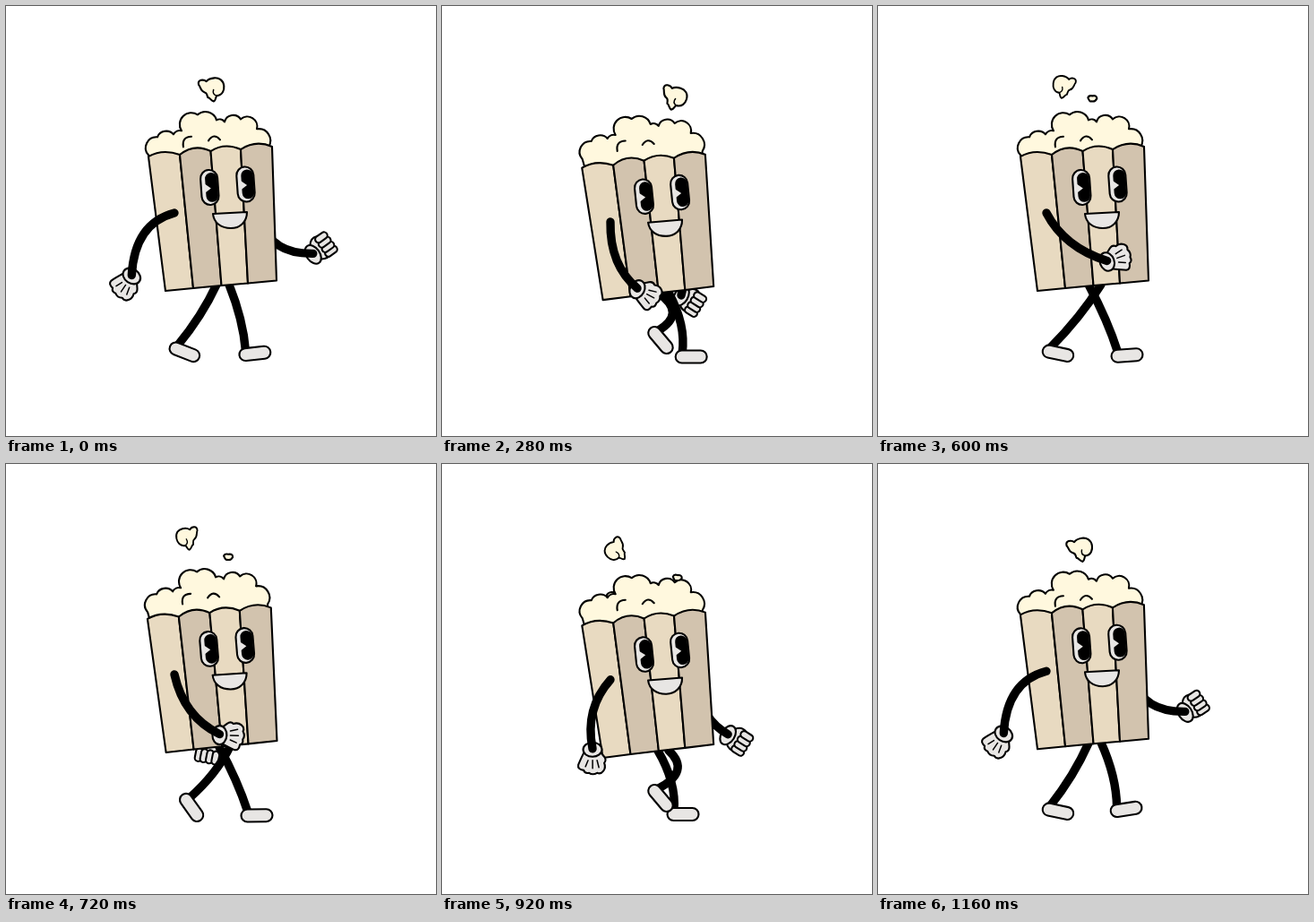
Recreate the animation shown at these times as an HTML page. Size 480 px wide and 480 px high, loop 1200 ms.

```html
<!DOCTYPE html>
<html lang="en">
<head>
<meta charset="utf-8">
<title>Walking popcorn</title>
<style>
  html, body { margin: 0; width: 100%; height: 100%; overflow: hidden; background: #fff; }
  svg { display: block; width: 100vw; height: 100vh; }
  .ink { stroke: #000; stroke-width: 2.1; stroke-linejoin: round; stroke-linecap: round; }
  .line { fill: none; }
  .corn { fill: #fff8de; }
  .pale { fill: #e8e6e4; }
  .light { fill: #e8dac1; }
  .dark { fill: #d2c3ae; }
  .limb { fill: none; stroke: #000; stroke-width: 9.4; stroke-linecap: round; }
</style>
</head>
<body>
<svg viewBox="0 0 480 480">
  <defs>
    <g id="kernel" class="ink">
      <path class="corn" d="M-5 -9 C-8 -12 -15 -12 -14 -6 C-12 -4 -13 1 -8 3 C-5 4 -6 7 -5 9 C-3 9 -2 13 1 14 C4 13 3 10 5 8 C12 8 14 2 14 -2 C14 -9 9 -12 4 -12 C0 -12 -3 -11 -5 -9Z"/>
      <path class="line" d="M5 8 Q0 6 2 1" stroke-width="1.5"/>
    </g>
    <rect id="foot" class="ink pale" x="-17.5" y="-7" width="35" height="14" rx="7"/>
    <g id="palm" class="ink pale">
      <path d="M3 -9 L8 -13 Q12 -16 15 -13 Q20 -15 24 -12 Q28 -9 26 -5 Q29 0 26 4 Q27 9 23 10 Q22 17 17 16 Q12 14 4 10Z"/>
      <path class="line" d="M12 -5 L20 -7 M12 0 H21 M12 5 L19 8" stroke-width="1.5"/>
      <ellipse rx="8" ry="10.5"/>
    </g>
    <rect id="finger" x="11" width="15" height="7.5" rx="3.7"/>
    <g id="fist" class="ink pale">
      <path d="M3 -10 Q8 -17 15 -14 L18 11 Q10 14 4 9Z"/>
      <use href="#finger" y="5"/>
      <use href="#finger" y="-1"/>
      <use href="#finger" y="-7.5"/>
      <use href="#finger" y="-14"/>
      <ellipse rx="7.5" ry="11.5"/>
    </g>
    <g id="eye">
      <rect class="ink pale" x="-9.5" y="-19.5" width="19" height="39" rx="9.5"/>
      <rect x="-4.5" y="-16.5" width="13.5" height="33" rx="6.75"/>
      <path class="pale" d="M-6 -5 L1.5 1 L-6 6Z"/>
    </g>
  </defs>

  <use id="kernel1" href="#kernel"/>
  <use id="kernel2" href="#kernel"/>
  <path id="crumb" class="ink corn" d="M-5 -1 Q-4 -4 0 -3 Q5 -4 5 0 Q3 4 -1 3 Q-3 4 -5 -1Z"/>

  <use id="backHand" href="#fist"/>
  <path id="backArm" class="limb"/>
  <path id="legA" class="limb"/>
  <path id="legB" class="limb"/>
  <use id="footA" href="#foot"/>
  <use id="footB" href="#foot"/>

  <g id="heap" class="ink">
    <path class="corn" d="M163 180 L159 166 A12 12 0 0 1 169 146 A10.5 10 0 0 1 187 143 A8 8 0 0 1 196 139 A13 13 0 0 1 214 121 A13 13 0 0 1 235 127 A7 7 0 0 1 244 129 A10 10 0 0 1 262 126 A11 11 0 0 1 280 137 A13 13 0 0 1 293 157 L292 174Z"/>
    <path class="line" d="M198 157 Q196 146 207 145.5 M226 150 Q232 141 239 149"/>
  </g>

  <g id="bucket">
    <g class="ink">
      <path class="light" d="M159 168 Q175 159 194 166 L209 315 L178 318Z"/>
      <path class="dark" d="M194 166 Q210 153 228.5 162 L240.5 312 L209 315Z"/>
      <path class="light" d="M228.5 162 Q244 152 262 160 L270 309.5 L240.5 312Z"/>
      <path class="dark" d="M262 160 Q279 149 297 157 L302 306.5 L270 309.5Z"/>
      <path class="pale" d="M231 232 L269 230 C269 241 261 248 251 248 C240 248 232 242 231 232Z"/>
    </g>
    <use href="#eye" transform="translate(227.3 202.5) rotate(-4)"/>
    <use href="#eye" transform="translate(267.5 199) rotate(-4)"/>
  </g>

  <use id="frontHand" href="#palm"/>
  <path id="frontArm" class="limb"/>
</svg>
<script>
const LOOP = 1200, STEP = 40;
const set = (id, name, value) => document.getElementById(id).setAttribute(name, value);
const wrap = t => (t % LOOP + LOOP) % LOOP;
const bob = t => (1 - Math.cos(t * Math.PI / 300)) / 2;
const place = (x, y, turn) => `translate(${x} ${y}) rotate(${turn})`;
const bend = (x0, y0, cx, cy, x1, y1) => `M${x0} ${y0}Q${cx} ${cy} ${x1} ${y1}`;

// One stride of a foot: [time, x, y, tilt]
const stride = [
  [0, 199, 387, 16], [180, 220, 380, 75], [300, 244, 373, 50], [500, 275, 383, -10],
  [620, 278, 390, -4], [940, 269, 391, 0], [1080, 236, 391, 0]
];

function slope(d0, h0, d1, h1) {
  return d0 * d1 <= 0 ? 0 : (d0 * h1 + d1 * h0) / (h0 + h1);
}

// Smooth cyclic interpolation that never overshoots a key.
function sample(keys, t) {
  const n = keys.length;
  const key = i => {
    const turn = Math.floor(i / n), k = keys[i - turn * n];
    return [k[0] + turn * LOOP, ...k.slice(1)];
  };
  let i = -1;
  while (key(i + 1)[0] <= t) i++;
  const [a, b, c, d] = [i - 1, i, i + 1, i + 2].map(key);
  const h0 = b[0] - a[0], h = c[0] - b[0], h1 = d[0] - c[0];
  const u = (t - b[0]) / h, v = 1 - u;
  return b.slice(1).map((p, j) => {
    const q = c[j + 1], s = (q - p) / h;
    const m0 = slope((p - a[j + 1]) / h0, h0, s, h);
    const m1 = slope(s, h, (d[j + 1] - q) / h1, h1);
    return p * v * v * (1 + 2 * u) + q * u * u * (3 - 2 * u) + h * u * v * (m0 * v - m1 * u);
  });
}

function arm(side, sx, sy, ex, ey, x, y, turn) {
  set(side + 'Arm', 'd', bend(sx, sy, ex, ey, x, y));
  set(side + 'Hand', 'transform', place(x, y + 1, turn));
}

// Wrists swing along arcs; elbows and hands follow the wrist.
function arms(t, b) {
  const w = (t + 20) * 2 * Math.PI / LOOP, c = Math.cos(w), s = Math.sin(w), push = s ** 5;

  const fx = 198 - 58 * c + 20 * push, fy = 322 - 0.0087 * (fx - 190) ** 2;
  arm('front', 188, 231 + 10 * b, 65 + 0.56 * fx, 290 - 0.0097 * (fx - 210) ** 2,
    fx, fy, 126 - 1.25 * (fx - 139));

  const bx = 271 + 72 * c + 16 * s * s - 20 * push, by = 323 - 0.0088 * (bx - 270) ** 2;
  arm('back', 285, 240 + 9 * b, 200 + 0.28 * bx, 194 + 0.3 * by,
    bx, by, 40 - 75 * c - 8 * s);
}

// The knee bends more the closer the ankle comes to the hip.
function leg(name, phase, hipX, hipY) {
  const [x, y, tilt] = sample(stride, wrap(phase));
  const r = tilt * Math.PI / 180, c = Math.cos(r), s = Math.sin(r);
  const ax = x - 10 * c + 4 * s, ay = y - 10 * s - 4 * c;
  const slack = Math.max(0, 78 - Math.hypot(ax - hipX, ay - hipY));
  const kx = (hipX + ax) / 2 + 5 + 0.8 * slack, ky = (hipY + ay) / 2 + 2;
  set('leg' + name, 'd', bend(hipX, hipY, kx, ky, ax, ay));
  set('foot' + name, 'transform', place(x, y, tilt));
}

// A piece tossed up: position at the top, time of the top, speed, fall and spin.
function toss(id, t, { top, x, y, speed, fall, turn, spin, size = '1' }) {
  const d = Math.max(-400, Math.min(400, wrap(t - top + LOOP / 2) - LOOP / 2));
  const drop = fall * Math.abs(d / 370) ** 2.5;
  set(id, 'transform', place(x + speed * d, y + drop, turn + spin * d) + ` scale(${size})`);
}

function draw(t) {
  const b = bob(t + 8), lag = bob(t - 80);
  set('bucket', 'transform', place(235 - 0.7 * b, 240 + 9.5 * b, -1.7 * b) +
    ` scale(1 ${1 - 0.013 * b}) translate(-235 -240)`);
  set('heap', 'transform', `translate(${-2.3 * b} ${8 * lag - 1})`);
  arms(t, b);
  leg('A', t + 20, 235 + 6 * b, 311 + 9 * b);
  leg('B', t + 580, 249 + 4 * b, 311 + 9 * b);
  toss('kernel1', t, { top: 90, x: 239, y: 91, speed: 0.105, fall: 58, turn: 2, spin: 0.08 });
  toss('kernel2', t, { top: 740, x: 202, y: 82.5, speed: -0.04, fall: 83, turn: -16, spin: -0.17, size: '-.88 .95' });
  toss('crumb', t, { top: 650, x: 243, y: 103, speed: 0.073, fall: 53, turn: 0, spin: 0.02 });
}

const start = performance.now();
function tick() {
  const t = wrap(Math.max(0, performance.now() - start));
  draw(Math.floor(t / STEP) * STEP);
  requestAnimationFrame(tick);
}
tick();
</script>
</body>
</html>
```
